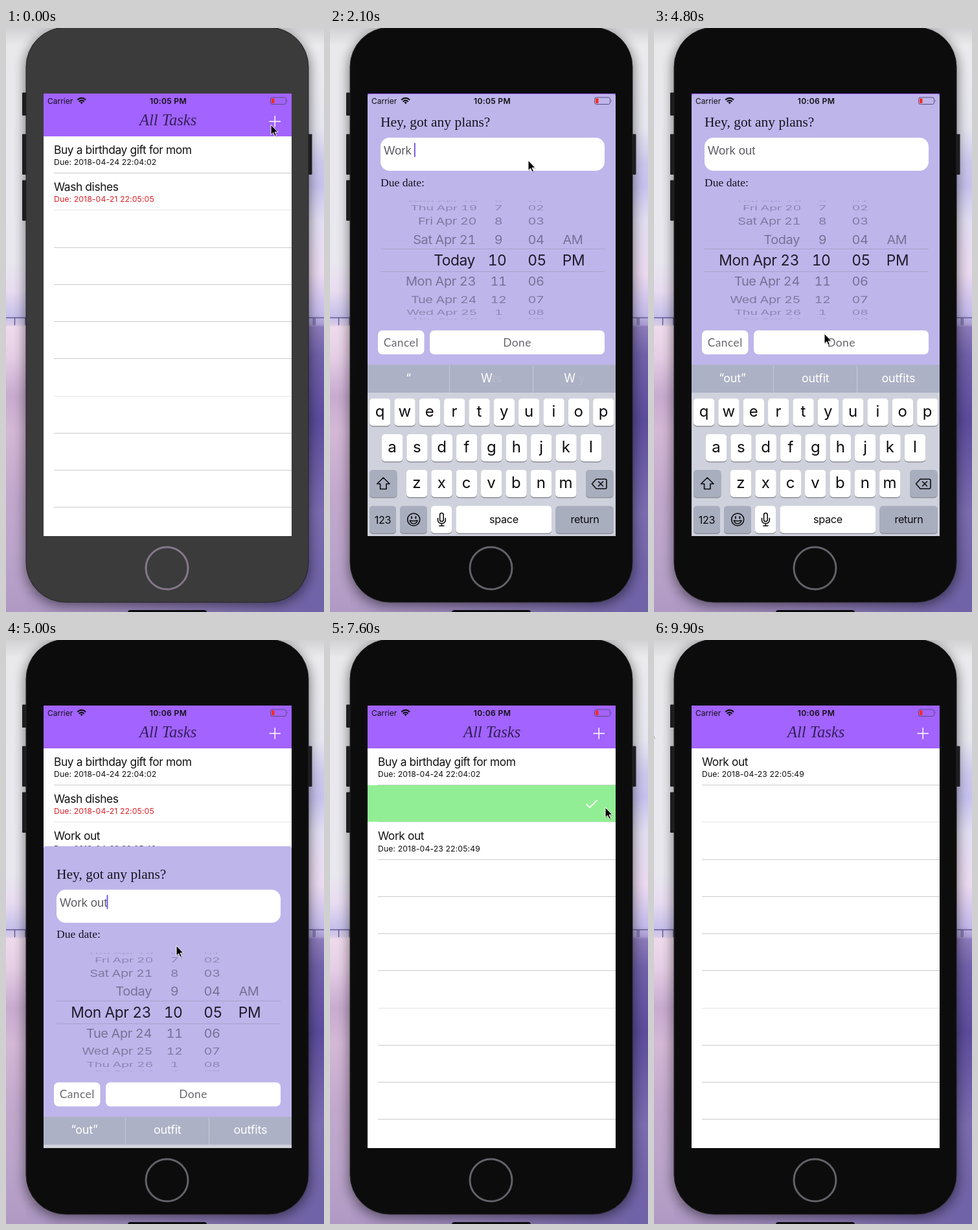
Animation of 491x900 px, one loop 10000 ms. Source, as an HTML page:

```html
<!DOCTYPE html>
<html lang="en">
<head>
<meta charset="utf-8">
<title>Task list</title>
<style>
html, body { margin: 0; width: 100%; height: 100%; overflow: hidden; background: #e6e6ea; }
svg { display: block; width: 491px; height: 900px; font-family: Inter, sans-serif; }
.field { font-family: "Liberation Sans", Arial, sans-serif; font-size: 18.4px; fill: #5c5c64; }
.serif { font-family: "Liberation Serif", serif; }
.btn { font-family: Lato, sans-serif; font-size: 17.4px; letter-spacing: .45px; fill: #68676d; }
.title { font-size: 17.4px; letter-spacing: -.4px; }
.due { font-size: 12.25px; letter-spacing: .1px; }
.mid { text-anchor: middle; }
#picker { font-variant-numeric: tabular-nums; }
</style>
</head>
<body>
<svg viewBox="0 0 491 900" xmlns="http://www.w3.org/2000/svg">
  <defs>
    <linearGradient id="left" x2="0" y2="1">
      <stop offset="0" stop-color="#d2d2d5"/><stop offset=".03" stop-color="#e9e9ec"/>
      <stop offset=".4" stop-color="#e9e8ef"/><stop offset=".45" stop-color="#e8dcf1"/>
      <stop offset=".495" stop-color="#c6c0ea"/><stop offset=".508" stop-color="#d9cbe6"/>
      <stop offset=".512" stop-color="#efdbec"/><stop offset=".56" stop-color="#e6cfe6"/>
      <stop offset=".63" stop-color="#c8abd0"/><stop offset=".69" stop-color="#d4b8d6"/>
      <stop offset=".8" stop-color="#c2a8cd"/><stop offset=".9" stop-color="#bba4ca"/>
      <stop offset="1" stop-color="#b09ac4"/>
    </linearGradient>
    <linearGradient id="right" x2="0" y2="1">
      <stop offset="0" stop-color="#d2d2d5"/><stop offset=".03" stop-color="#ebebee"/>
      <stop offset=".17" stop-color="#e6e6ef"/><stop offset=".23" stop-color="#cbc7ec"/>
      <stop offset=".27" stop-color="#c6c2ee"/><stop offset=".33" stop-color="#e2def1"/>
      <stop offset=".42" stop-color="#ebdaf0"/><stop offset=".49" stop-color="#c3b9ea"/>
      <stop offset=".508" stop-color="#a99cd2"/><stop offset=".512" stop-color="#8c7bba"/>
      <stop offset=".56" stop-color="#7161aa"/><stop offset=".67" stop-color="#5c4c9c"/>
      <stop offset=".83" stop-color="#7b6cb0"/><stop offset=".93" stop-color="#7264a8"/>
      <stop offset="1" stop-color="#7062a6"/>
    </linearGradient>
    <linearGradient id="floor">
      <stop offset="0" stop-color="#b09ac4"/><stop offset="1" stop-color="#7062a6"/>
    </linearGradient>
    <filter id="soft" x="-20%" y="-20%" width="140%" height="140%"><feGaussianBlur stdDeviation="9"/></filter>
    <clipPath id="screen"><rect x="58" y="101" width="383" height="682"/></clipPath>
    <clipPath id="wheel"><rect x="78" y="266" width="346" height="183"/></clipPath>
  </defs>
  <rect width="246" height="900" fill="url(#left)"/>
  <rect x="245" width="246" height="900" fill="url(#right)"/>
  <rect y="868" x="31" width="436" height="32" fill="url(#floor)"/>
  <path d="M0 446.500H31M467 446.500H491M13.500 447V458M30 447V458M474.500 447V458M477 447V458" stroke="#655b91" stroke-width="1.4"/>
  <rect x="29" y="4" width="440" height="886" rx="60" opacity=".48" filter="url(#soft)"/>
  <rect x="188" y="897" width="122" height="12" rx="4" fill="#0b0b0d"/>
  <g fill="#1d1d20">
    <rect x="25" y="99.500" width="8" height="35.500" rx="1"/>
    <rect x="25" y="163.500" width="8" height="62.500" rx="1"/>
    <rect x="25" y="234.500" width="8" height="62.500" rx="1"/>
    <rect x="465" y="163.500" width="7.500" height="62.500" rx="1"/>
  </g>
  <rect id="body" x="31" y="-1" width="436" height="886" rx="61" stroke="#242427"/>
  <circle id="home" cx="248.500" cy="832.500" r="32.500" fill="none" stroke-width="3"/>
  <g clip-path="url(#screen)">
    <rect x="58" y="101" width="383" height="682" fill="#fff"/>
    <g id="list"></g>
    <rect x="58" y="101" width="383" height="66" fill="#a263ff"/>
    <text class="serif" x="206" y="149.500" font-size="24.500" font-style="italic" fill="#33205a">All Tasks</text>
    <path d="M406.500 144H424M415.200 135.200V152.800" stroke="#fff" stroke-width="1.500"/>
    <g id="form">
      <rect x="58" y="102" width="383" height="684" rx="4" fill="#beb5eb"/>
      <text class="serif" x="78" y="152" font-size="21.500" fill="#17141f">Hey, got any plans?</text>
      <rect x="78" y="169" width="346" height="51" rx="14" fill="#fff"/>
      <text class="serif" x="78" y="243.500" font-size="17.600" fill="#17141f">Due date:</text>
      <path d="M78 340.500H424M78 375.500H424" stroke="#a7a0c8"/>
      <g id="entry"></g>
      <g id="picker" clip-path="url(#wheel)"></g>
      <g id="buttons"></g>
      <g id="keys"></g>
      <g id="hints"></g>
    </g>
    <g>
      <text x="64" y="116.500" font-size="12" fill="#111">Carrier</text>
      <g fill="none" stroke="#111" stroke-width="2">
        <path d="M110.200 110.700Q116.700 105 123.200 110.700M112.600 113.400Q116.700 109.900 120.800 113.400"/>
        <path d="M114.400 114.600Q116.700 112.800 119 114.600L116.700 117.200Z" fill="#111" stroke="none"/>
      </g>
      <text id="clock" class="mid" x="250.500" y="116.500" font-size="12.200" font-weight="600" letter-spacing=".3" fill="#111"></text>
      <rect x="408.500" y="107" width="24" height="10.500" rx="2.800" fill="none" stroke="#5d4a7c"/>
      <rect x="410" y="108.500" width="4.500" height="7.500" rx="1" fill="#fb2b20"/>
      <path d="M434 110.500q1.800 1.700 0 3.600z" fill="#5d4a7c"/>
    </g>
  </g>
  <g id="cursor">
    <path d="M1 2V17L4.600 13.800L7 19.200L9.400 18.200L7 13H12Z" opacity=".25"/>
    <path d="M0 0V15.500L3.600 12.300L6 17.800L8.500 16.800L6.100 11.400H11Z" stroke="#fff" stroke-width="1"/>
  </g>
</svg>
<script>
const LOOP = 10000, STEP = 100, ROW = 57.25;
const $ = id => document.getElementById(id);
const clamp = v => Math.max(0, Math.min(1, v));
const ease = v => v * v * (3 - 2 * v);
const ramp = (t, a, b) => ease(clamp((t - a) / (b - a)));

const box = (x, y, w, h, r, fill) =>
  `<rect x="${x}" y="${y}" width="${w}" height="${h}" rx="${r}" fill="${fill}"/>`;
const label = (s, x, y, attrs) => `<text x="${x}" y="${y}" ${attrs}>${s}</text>`;

// time, x, y of the pointer tip
const path = [
  [0, 409, 149], [100, 409, 149], [400, 363, 176], [900, 306, 204], [3000, 306, 204],
  [3400, 190, 392], [3900, 190, 360], [4200, 190, 360], [4700, 263, 471], [5200, 263, 471],
  [5900, 415, 107], [6300, 415, 107], [6800, 250, 254], [6900, 250, 254], [7400, 425, 258],
  [7700, 425, 258], [8300, 295, 200], [8400, 295, 200], [8600, 348, 200], [8900, 428, 202],
  [9200, 428, 202], [9800, -9, 139], [LOOP, -9, 139]
];

function pointer(t) {
  const i = Math.max(1, path.findIndex(p => p[0] > t));
  const [a, b] = [path[i - 1], path[i]];
  const k = ramp(t, a[0], b[0]);
  return [a[1] + (b[1] - a[1]) * k, a[2] + (b[2] - a[2]) * k];
}

// start, release and gone times of the swipe that completes each task
const tasks = [
  { name: 'Buy a birthday gift for mom', due: '2018-04-24 22:04:02', swipe: [8400, 8900, 9200], from: 295 },
  { name: 'Wash dishes', due: '2018-04-21 22:05:05', late: true, swipe: [6900, 7400, 7700], from: 250 },
  { name: 'Work out', due: '2018-04-23 22:05:49', added: 4900 }
];

function slide(task, t) {
  if (!task.swipe || t < task.swipe[0]) return 0;
  const [, up, gone] = task.swipe;
  const drag = pointer(Math.min(t, up))[0] - task.from;
  return drag + (383 - drag) * ramp(t, up, gone - 100);
}

function drawList(t) {
  const lineColor = i => i % 5 === 1 ? '#e6e6e9' : '#cbcbce';
  let out = '', y = 166.5;
  for (let i = 0; i < 10; i++) {
    const line = Math.round(223 + ROW * i);
    out += `<path d="M74 ${line + .5}H441" stroke="${lineColor(i)}"/>`;
  }
  tasks.forEach(task => {
    if (t < (task.added || 0)) return;
    const open = task.swipe ? 1 - ramp(t, task.swipe[2] - 100, task.swipe[2] + 200) : 1;
    if (!open) return;
    const dx = slide(task, t), h = ROW * open;
    if (dx) {
      out += box(58, y, 383, h - .8, 0, '#92ee94');
      if (open === 1) {
        const c = 58 + dx - 37;
        out += `<path d="M${c - 8.5} ${y + 29}l5.500 5.500l11.500 -11.500" fill="none" stroke="#fff" stroke-width="1.800"/>`;
      }
    }
    if (open === 1) {
      const line = Math.round(y + 56.5) - y + .5;
      out += `<g transform="translate(${58 + dx} ${y})">` + box(0, .5, 383, line, 0, '#fff') +
        `<path d="M16 ${line}H383" stroke="${lineColor(Math.round((y - 166.5) / ROW))}"/>` +
        label(task.name, 16, 27, 'class="title" fill="#111"') +
        label('Due: ' + task.due, 16, 44.6, `class="due" fill="${task.late ? '#dd2027' : '#111'}"`) + '</g>';
    }
    y += h;
  });
  $('list').innerHTML = out;
}

const pressed = [1300, 1500, 1700, 1900, 2100, 2500, 2700, 2900];
const typed = t => 'Work out'.slice(0, pressed.filter(p => t >= p).length);
const pen = document.createElement('canvas').getContext('2d');
pen.font = '18.4px "Liberation Sans", Arial, sans-serif';

function drawEntry(t, text) {
  const shown = text || 'E.g. Do lauduary, go shopping...';
  let out = label(shown, 83, 195, 'class="field" xml:space="preserve"');
  if (t % 1000 < 600) out += box(82.2 + pen.measureText(shown).width, 177, 2, 22, 1, '#7a5be0');
  $('entry').innerHTML = out;
}

const WEEK = ['Sun', 'Mon', 'Tue', 'Wed', 'Thu', 'Fri', 'Sat'];
const dayName = i => i ? `${WEEK[(i + 7) % 7]} Apr ${22 + i}` : 'Today';

// one line on the turning wheel, d rows away from its middle
function wheelLine(s, x, d, anchor) {
  const a = d * 20.4 * Math.PI / 180;
  if (Math.abs(a) > 1.5) return '';
  const on = Math.abs(d) < .5, size = on ? 22.8 : 20;
  return `<text transform="translate(${x} ${358 + 92 * Math.sin(a)}) scale(1 ${Math.cos(a)})" y="${size * .36}"
    font-size="${size}" letter-spacing="-.4" text-anchor="${anchor}" fill="#1f1b29"
    opacity="${on ? 1 : .46 * Math.pow(Math.cos(a), .6)}">${s}</text>`;
}

function drawPicker(t) {
  const turn = ramp(t, 3400, 4000);
  let out = '';
  for (let i = -4; i <= 5; i++) {
    const d = i - turn;
    out += wheelLine(dayName(i), 224 + Math.abs(d), d, 'end');
  }
  for (let d = -4; d <= 4; d++) {
    out += wheelLine((9 + d) % 12 + 1, d ? 260 : 258, d, 'middle');
    out += wheelLine('0' + (5 + d), d ? 318 : 319.5, d, 'middle');
  }
  out += wheelLine('AM', 375, -1, 'middle') + wheelLine('PM', 376, 0, 'middle');
  $('picker').innerHTML = out;
}

function drawButtons(text) {
  const button = (s, x, w) => box(x, 466, w, 37, 7, '#fff') + label(s, x + w / 2, 490.5, 'class="btn mid"');
  $('buttons').innerHTML = text ? button('Cancel', 74, 71.5) + button('Done', 154, 270) : button('Cancel', 74, 350);
}

function hintsFor(text) {
  const fade = s => `<tspan opacity=".35" fill-opacity=".35">${s}</tspan>`;
  if (!text) return ['and', 'with', 'amp'];
  if (text === 'Work ') return ['“', 'W' + fade('ts'), 'W' + fade(' y')];
  if (text.length < 5) return [`“${text}”`, 'Work', 'Works'];
  if (text.length < 7) return [`“${text.slice(5)}”`, 'on', 'of'];
  return [`“${text.slice(5)}”`, 'outfit', 'outfits'];
}

function drawHints(text) {
  $('hints').innerHTML = hintsFor(text).map((s, i) =>
    label(s, 121 + 128.2 * i, 545.5, 'class="mid" font-size="18" letter-spacing="-.2" fill="#fff"')).join('');
}

function drawKeys() {
  const key = (x, y, w, dark) =>
    box(x, y + 1.2, w, 42.3, 5, '#8d8f99') + box(x, y, w, 42, 5, dark ? '#a9aebe' : '#fff');
  let out = box(58, 519, 383, 44, 0, '#adb1c5') + box(58, 562, 383, 222, 0, '#cfd2dc') +
    '<path d="M184.500 520V562M313.500 520V562" stroke="#c7cad8"/>';
  [['qwertyuiop', 61, 571], ['asdfghjkl', 80, 626], ['zxcvbnm', 118, 681]].forEach(([row, x, y]) => {
    [...row].forEach((c, i) => {
      const kx = x + 38.35 * i;
      out += key(kx, y, 32.3) + label(c, kx + 16, y + 28, 'class="mid" font-size="24" fill="#0c0c0e"');
    });
  });
  out += key(61, 681, 42.5, 1) + key(395, 681, 42.5, 1) + key(61, 736.500, 41, 1) + key(108, 736.500, 42, 1) +
    key(156, 736.500, 32, 0) + key(194.500, 736.500, 147.500, 0) + key(348.500, 736.500, 89.500, 1);
  const word = 'class="mid" font-size="16.200" letter-spacing="-.3" fill="#0c0c0e"';
  out += label('123', 81.5, 763.5, word) + label('space', 268.5, 763, word) + label('return', 393.5, 763, word);
  out += `<g fill="none" stroke="#0c0c0e" stroke-width="1.600" stroke-linejoin="round" stroke-linecap="round">
    <path d="M82.300 693L92 702.500H87V710.500H77.600V702.500H72.600Z"/>
    <path d="M404.500 702.500L411 695.200H425Q427 695.200 427 697.200V708Q427 710 425 710H411ZM414.500 699l7 7M421.500 699l-7 7"/>
    <circle cx="129.200" cy="757.500" r="9.500"/>
    <path d="M123.300 759Q129.200 760.500 135.100 759Q133.500 764 129.200 764Q124.900 764 123.300 759Z"/>
    <path d="M126 753.200v2.200M132.400 753.200v2.200" stroke-width="2"/>
    <rect x="169.600" y="747.500" width="5.600" height="13" rx="2.800"/>
    <path d="M166.500 755.500V758.500Q167 763.500 172.400 763.500Q177.800 763.500 178.300 758.500V755.500M172.400 763.500V767M168.800 767.200H176"/></g>`;
  $('keys').innerHTML = out;
}

function draw(t) {
  const first = t < 100;
  $('body').setAttribute('fill', first ? '#3b3b3b' : '#0c0c0c');
  $('home').setAttribute('stroke', first ? '#86778c' : '#646169');
  $('clock').textContent = t < 3900 ? '10:05 PM' : '10:06 PM';

  const down = 1 - ramp(t, 0, 350) + ramp(t, 4850, 5250);
  const shown = !first && down < 1;
  $('form').setAttribute('display', shown ? 'inline' : 'none');
  $('form').setAttribute('transform', `translate(0 ${682 * down})`);
  drawList(t);
  if (shown) {
    const text = typed(t);
    drawEntry(t, text);
    drawPicker(t);
    drawButtons(text);
    drawHints(text);
  }
  $('cursor').setAttribute('transform', `translate(${pointer(t).join(' ')})`);
}

let last = -1;
function tick() {
  const t = Math.floor(performance.now() % LOOP / STEP) * STEP;
  if (t !== last) draw(last = t);
  requestAnimationFrame(tick);
}
drawKeys();
tick();
</script>
</body>
</html>
```
